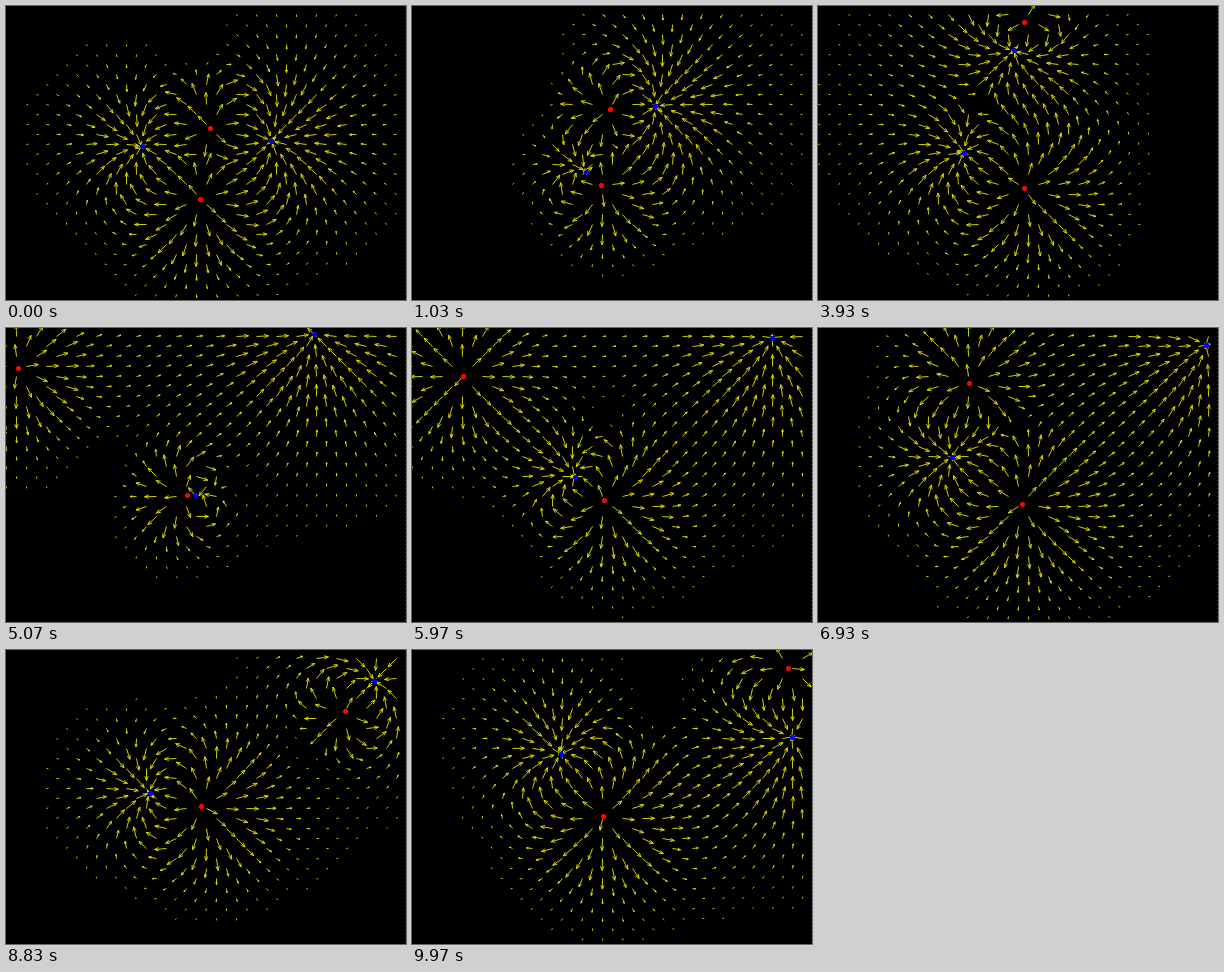
Recreate the animation shown at these times as an HTML page with a canvas. Size 400 by 294 pixels, loop 10000 ms.

```html
<!DOCTYPE html>
<html>
<head>
<meta charset="utf-8">
<style>
html, body { margin: 0; width: 100%; height: 100%; overflow: hidden; background: #000; }
canvas { display: block; }
</style>
</head>
<body>
<canvas id="stage" width="400" height="294"></canvas>
<script>
const ctx = document.getElementById('stage').getContext('2d');
const WIDTH = 400, HEIGHT = 294, LOOP = 10000, FPS = 30, SPACING = 10;
const MIN_FIELD = 3.9e-5, FIELD_SCALE = 4.2e4, MAX_LENGTH = 12;
const RED = '#f00', BLUE = '#00f';

// Waypoints: [seconds, x, y]
const lightRedPath = [
  [0, 204, 122], [2.03, 195, 82], [3.93, 206, 16],
  [5.07, 12, 40], [8.83, 339, 61], [9.97, 376, 18]
];
const heavyBluePath = [
  [0, 265, 135], [2.03, 223, 72], [3.93, 196, 44], [5.07, 308, 6],
  [6.93, 388, 17], [8.83, 368, 31], [9.97, 380, 87]
];
// Swings in close to its red partner three times
const orbiterPath = [
  [0, 136, 140], [1.5, 182, 171], [2.03, 155, 153], [3.93, 146, 147], [5.07, 189, 167],
  [6.93, 134, 129], [8.83, 144, 143], [9.15, 170, 148], [9.97, 149, 104]
];

// Monotone cubic through the waypoints, for one coordinate
function follow(path, axis, t) {
  const last = path.length - 1;
  const slope = i => (path[i + 1][axis] - path[i][axis]) / (path[i + 1][0] - path[i][0]);
  const tangent = i => {
    const a = slope(Math.max(0, i - 1)), b = slope(Math.min(last - 1, i));
    return a * b > 0 ? 2 * a * b / (a + b) : 0;
  };
  let i = 0;
  while (i < last - 1 && t >= path[i + 1][0]) i++;
  const h = path[i + 1][0] - path[i][0], u = (t - path[i][0]) / h, w = 1 - u;
  return w * w * ((1 + 2 * u) * path[i][axis] + u * h * tangent(i)) +
    u * u * ((3 - 2 * u) * path[i + 1][axis] - w * h * tangent(i + 1));
}

const along = (path, t) => ({ x: follow(path, 1, t), y: follow(path, 2, t) });

// The red partner has twice the mass and balances the orbiter about their drifting centre
function partnerOf(orbiter, t) {
  const cx = 174.5 + 14 * t * Math.exp(-t / 2.5), cy = 175 - 0.3 * t * t;
  return { x: (3 * cx - orbiter.x) / 2, y: (3 * cy - orbiter.y) / 2 };
}

function chargesAt(t) {
  const orbiter = along(orbiterPath, t);
  return [
    { ...along(lightRedPath, t), q: 0.75, color: RED },
    { ...partnerOf(orbiter, t), q: 1.25, color: RED },
    { ...orbiter, q: -1, color: BLUE },
    { ...along(heavyBluePath, t), q: -1.65, color: BLUE }
  ];
}

function arrow(x, y, dx, dy, length) {
  const tipX = x + dx * length, tipY = y + dy * length;
  ctx.moveTo(x, y);
  ctx.lineTo(tipX, tipY);
  if (length < 3) return;
  const head = length * 0.35, half = head * 0.4;
  ctx.moveTo(tipX - dx * head - dy * half, tipY - dy * head + dx * half);
  ctx.lineTo(tipX, tipY);
  ctx.lineTo(tipX - dx * head + dy * half, tipY - dy * head - dx * half);
}

function fieldArrow(x, y, charges) {
  let ex = 0, ey = 0;
  for (const c of charges) {
    const dx = x - c.x, dy = y - c.y, r = Math.hypot(dx, dy) + 0.01;
    ex += c.q * dx / r ** 3;
    ey += c.q * dy / r ** 3;
  }
  const e = Math.hypot(ex, ey);
  if (e > MIN_FIELD) arrow(x, y, ex / e, ey / e, Math.min(MAX_LENGTH, e * FIELD_SCALE));
}

function dot(charge) {
  const x = Math.round(charge.x), y = Math.round(charge.y);
  ctx.fillStyle = charge.color;
  ctx.fillRect(x - 2, y - 1, 5, 3);
  ctx.fillRect(x - 1, y - 2, 3, 5);
}

function draw(t) {
  const charges = chargesAt(t);
  ctx.fillStyle = '#000';
  ctx.fillRect(0, 0, WIDTH, HEIGHT);
  ctx.fillStyle = '#333';
  for (let y = 0; y < HEIGHT; y += 4) ctx.fillRect(WIDTH - 1, y, 1, 1);

  ctx.strokeStyle = '#e6e600';
  ctx.lineWidth = 0.9;
  ctx.beginPath();
  // Arrows sit on every other grid point, like one colour of a chessboard
  for (let row = 0; row < 29; row++) {
    for (let col = 1 - row % 2; col < 40; col += 2) {
      fieldArrow(col * SPACING + 0.5, row * SPACING + 8.5, charges);
    }
  }
  ctx.stroke();
  charges.forEach(dot);
}

const start = performance.now();
function tick() {
  const t = (performance.now() - start) % LOOP;
  draw(Math.min(LOOP / 1000 * FPS - 1, Math.floor(t * FPS / 1000 + 0.1)) / FPS);
  requestAnimationFrame(tick);
}
tick();
</script>
</body>
</html>
```
